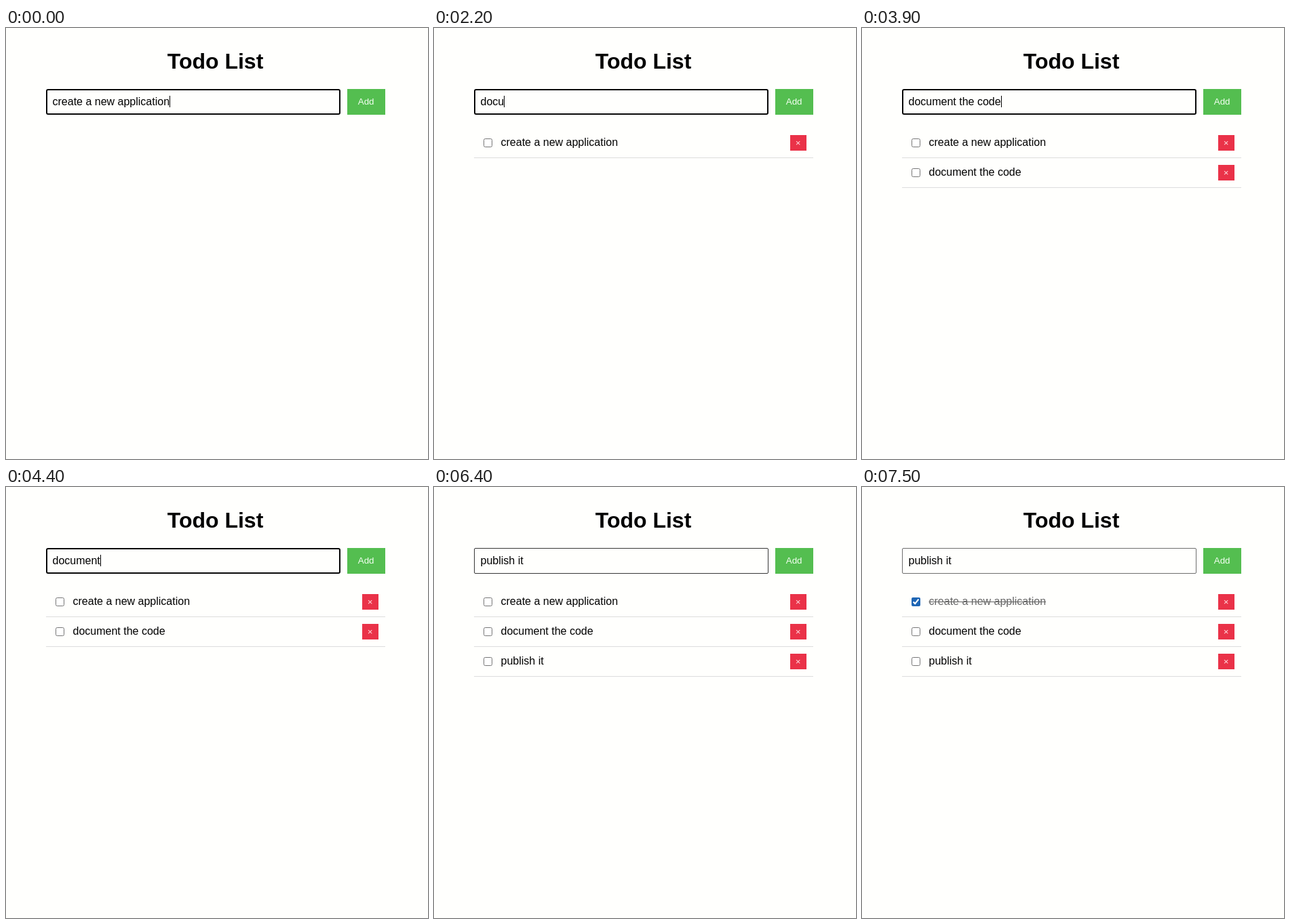
Recreate the animation shown at these times as an HTML page. Size 622 by 636 pixels, loop 8 s.

```html
<!DOCTYPE html>
<html lang="en">
<head>
<meta charset="utf-8">
<title>Todo List</title>
<style>
  html, body { margin: 0; width: 100%; height: 100%; overflow: hidden; background: #fffffd; }
  body { position: relative; font: 16px "Liberation Sans", Arial, sans-serif; color: #000; }
  body * { position: absolute; box-sizing: border-box; white-space: pre; margin: 0; }
  main { left: 58.5px; top: 0; width: 500px; height: 100%; pointer-events: none; }
  h1 { left: 0; top: 31px; width: 100%; font-size: 32px; line-height: 36px; text-align: center; }
  #field { left: 0; top: 90px; width: 434px; height: 38px; border: 1px solid; border-radius: 2px; }
  #field.focus { border-width: 2px; border-radius: 3px; }
  #entry { left: 10px; top: 100px; line-height: 18px; }
  #entry span { position: static; }
  #entry #caret { display: inline-block; width: 1px; height: 17px; background: #000; vertical-align: top; }
  .button { right: 0; color: #f4fff2; font-size: 13.333px; }
  #add { top: 90px; padding: 0 16px; line-height: 37px; height: 38px; background: #54be50; }
  .item { left: 0; width: 100%; height: 44px; border-bottom: 1px solid #ddd; }
  .item input { left: 14px; top: 15px; width: 13px; height: 13px; accent-color: #1f66b4; }
  .label { left: 40px; top: 12px; line-height: 18px; }
  .item .button { right: 10px; top: 10px; padding: 0 8px; height: 23px; line-height: 23px; background: #ea3248; color: #ffdfe2; }
  :checked + .label { color: #666; text-decoration: line-through; }
</style>
</head>
<body>
<main>
  <h1>Todo List</h1>
  <div id="field"></div>
  <div id="entry"><span id="typed"></span><span id="caret"></span></div>
  <div id="add" class="button">Add</div>
</main>
<script>
const LOOP = 8000, STEP = 100, BLINK = 200, CHECKED = 7200;

// Typed between from and to, added on click, field focused again at back, erased from erase on.
const tasks = [
  { text: "create a new application", from: -STEP, to: 0, ease: 1, add: 600, back: 1100, erase: 1300 },
  { text: "document the code", from: 1900, to: 3000, ease: 1.3, add: 3600, back: 3900, erase: 4100 },
  { text: "publish it", from: 4700, to: 5700, ease: 1, add: 6300, back: LOOP, erase: LOOP }
];

const $ = id => document.getElementById(id);
const field = $("field"), typed = $("typed"), caret = $("caret");

tasks.forEach((task, i) => {
  const row = task.row = document.createElement("div");
  row.className = "item";
  row.style.top = 148 + 44 * i + "px";
  row.innerHTML = `<input type="checkbox" tabindex="-1"><div class="label">${task.text}</div><div class="button">×</div>`;
  document.querySelector("main").append(row);
});
const firstBox = tasks[0].row.querySelector("input");

// The held backspace removes one letter, pauses, then repeats quickly.
function letters({ text, from, to, ease, erase }, t) {
  if (t >= erase) return Math.max(0, text.length - 1 - Math.floor(Math.max(0, t - erase - 200) * 0.08));
  const part = Math.min(1, (t - from) / (to - from));
  return Math.round(1 + (text.length - 1) * part ** ease);
}

function draw(t) {
  const task = tasks.findLast(({ from }) => from <= t);
  typed.textContent = task.text.slice(0, letters(task, t));

  const focus = t < task.add || t >= task.back;
  const blinkOff = t < task.add && (t - task.to) % (2 * BLINK) >= BLINK;
  const grey = focus ? 8 : Math.min(110, 25 + (t - task.add) * 0.3);
  field.className = focus ? "focus" : "";
  field.style.borderColor = `rgb(${grey}, ${grey}, ${grey})`;
  caret.style.visibility = focus && !blinkOff ? "visible" : "hidden";

  for (const { row, add } of tasks) row.style.display = t >= add ? "block" : "none";
  firstBox.checked = t >= CHECKED;
}

const start = performance.now();
function tick() {
  const t = (performance.now() - start) % LOOP;
  draw(Math.floor(t / STEP) * STEP);
  requestAnimationFrame(tick);
}
tick();
</script>
</body>
</html>
```
